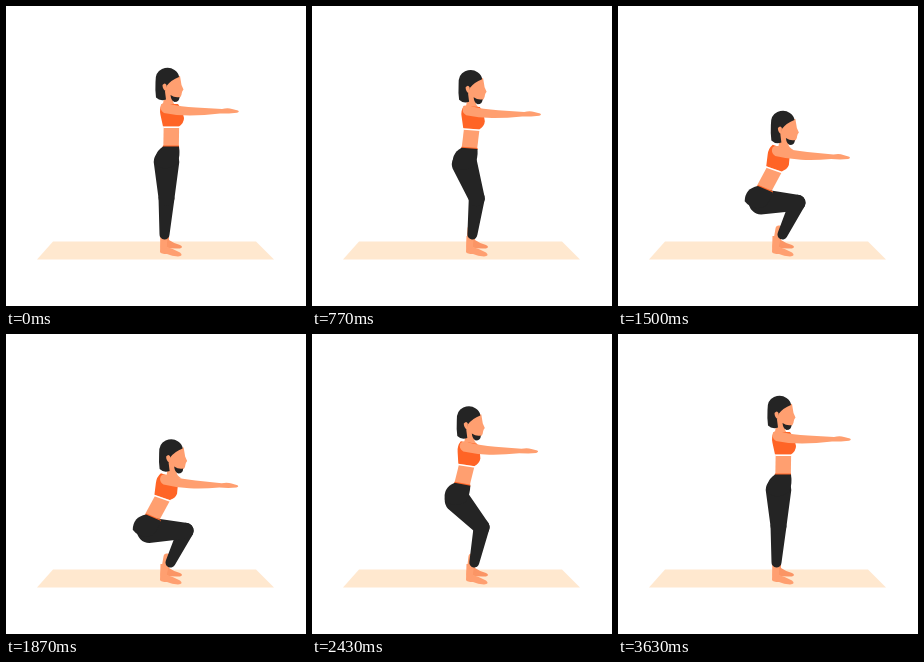
Animation of 300 by 300 pixels, one loop 3.66 s. Source, as an HTML page with a canvas:

```html
<!DOCTYPE html>
<html lang="en">
<head>
<meta charset="utf-8">
<title>Squat</title>
<style>
html, body { margin: 0; width: 100%; height: 100%; overflow: hidden; background: #fff; }
canvas { display: block; width: 100vw; height: 100vh; object-fit: contain; }
</style>
</head>
<body>
<canvas id="stage"></canvas>
<script>
const LOOP = 3660, BOTTOM = 1700, HOLD = 110, TRAVEL = 1180;
const MAX_BEND = 85 * Math.PI / 180, THIGH = 43, SHIN = 41;
const HIP_X = 160.5, HIP_Y = 149, FLOOR = HIP_Y + THIGH + SHIN;
const SKIN = '#ff9f70', SHADE = '#fb9565', ORANGE = '#ff6426', DARK = '#242424', MAT = '#ffe8cf';

const canvas = document.getElementById('stage');
const ctx = canvas.getContext('2d');
const scale = Math.max(1, window.devicePixelRatio || 1);
canvas.width = canvas.height = 300 * scale;

const shapes = {
  mat: 'M47 235.5H250L268 253.5H31Z',
  farFoot: 'M157 230H163V234Q168 237.500 174 239Q178 241 174 242.500Q166 243 157 241Z',
  nearFoot: 'M154.500 230H161V241Q168 243 174 246.500Q178 250 172 250.500Q166 250 161 248Q155 248 154 246Z',
  pelvis: 'M157 140.500H173Q174.500 150 171.500 157Q162 166 151 160Q146 148 157 140.500Z',
  band: 'M157 139.500H173V141.500H156.500Z',
  chest: 'M156 98Q153 103 154.500 109L157 120.500H173Q178 117 178 112L176 104L172 98Z',
  hem: 'M157 120.500H174V122H157.500Z',
  neck: 'M157 84H167V95Q167 98 172 101H156Q158 96 158 86Z',
  chinHair: 'M164.500 89Q169 92 173.500 91Q173.500 96 168.500 96Q165 94.500 164.500 89Z',
  face: 'M157 78Q162 67 174 70Q175 76 175.500 79L177.500 83.500Q176 85 175.800 87Q175.500 92 171 92.500Q164 92 158 89Z',
  hair: 'M149.500 76Q149 66 156 63Q163 60 168.500 64Q172.800 67 173 71Q165 74 160.500 80L159 85.500L160 93.500Q154 95.500 150 91.500Q149 85 149.500 76Z',
  ear: 'M156.500 79Q159 76 160.500 79Q161 83 159.500 85Q156.500 83 156.500 79Z',
  arm: 'M155 98.500Q158 95.500 164 98Q174 100.500 190 101.500L216 103Q222 101.500 226 103L232 104.500Q234 106 231 106.800L223 107.500L214 107.500Q198 109.500 184 109.500Q170 109.500 158 107Q153 104 155 98.500Z'
};
for (const k in shapes) shapes[k] = new Path2D(shapes[k]);

function fill(name, color) {
  ctx.fillStyle = color;
  ctx.fill(shapes[name]);
}

// Draws inside a moved frame turned about a pivot.
function placed(dx, dy, turn, px, py, draw) {
  ctx.save();
  ctx.translate(dx + px, dy + py);
  ctx.rotate(turn);
  ctx.translate(-px, -py);
  draw();
  ctx.restore();
}

// Tapered limb with round ends.
function limb(x1, y1, r1, x2, y2, r2) {
  const a = Math.atan2(y2 - y1, x2 - x1) + Math.PI / 2;
  ctx.beginPath();
  ctx.arc(x1, y1, r1, a, a + Math.PI);
  ctx.arc(x2, y2, r2, a + Math.PI, a + 2 * Math.PI);
  ctx.closePath();
  ctx.fill();
}

function bendAt(t) {
  const u = 1 - (Math.abs(t - BOTTOM) - HOLD) / TRAVEL;
  const c = Math.min(1, Math.max(0, u));
  return MAX_BEND * (1 - Math.cos(Math.PI * c)) / 2;
}

function draw(t) {
  const bend = bendAt(t), shin = bend * 0.33;
  const sin = Math.sin(bend), cos = Math.cos(bend);
  const lean = Math.sin(bend * 0.41);
  const kneeX = HIP_X + SHIN * Math.sin(shin);
  const kneeY = FLOOR - SHIN * Math.cos(shin);
  const hipX = kneeX - THIGH * sin, hipY = kneeY - THIGH * cos;
  const dx = hipX - HIP_X, dy = hipY - HIP_Y;
  const chestX = dx + 33 * lean;
  const waistX = dx + 3 * sin, waistY = dy - 3 * sin;

  ctx.setTransform(scale, 0, 0, scale, 0, 0);
  ctx.fillStyle = '#fff';
  ctx.fillRect(0, 0, 300, 300);
  fill('mat', MAT);
  fill('farFoot', SHADE);
  fill('nearFoot', SKIN);
  limb(157.7, 240, 3.2, 158 + 3 * sin, 223, 3.5);

  // belly
  ctx.strokeStyle = SKIN;
  ctx.lineWidth = 15.5;
  ctx.beginPath();
  ctx.moveTo(165.5 + chestX, 113 + dy);
  ctx.lineTo(165 + waistX, 146 + waistY);
  ctx.stroke();

  // leggings
  ctx.fillStyle = DARK;
  limb(kneeX, kneeY, 8, 158.5 + 6 * sin, 228.5, 5);
  limb(hipX + 7 * sin - 3 * sin * cos, hipY + 7 * cos + 3 * sin * sin, 12.8, kneeX, kneeY, 8);
  placed(waistX, waistY, bend * 0.28, HIP_X, HIP_Y, () => {
    fill('band', ORANGE);
    fill('pelvis', DARK);
  });

  placed(dx + 48 * lean, dy, 0, 0, 0, () => {
    fill('neck', SKIN);
    fill('face', SKIN);
    fill('chinHair', DARK);
    fill('hair', DARK);
    fill('ear', SKIN);
  });
  placed(chestX, dy, bend * 0.23, 165, 108, () => {
    fill('chest', ORANGE);
    fill('hem', '#fff');
  });
  placed(dx + 41 * lean, dy, bend * 0.03, 158, 102, () => fill('arm', SKIN));
}

function tick() {
  draw(performance.now() % LOOP);
  requestAnimationFrame(tick);
}
tick();
</script>
</body>
</html>
```
